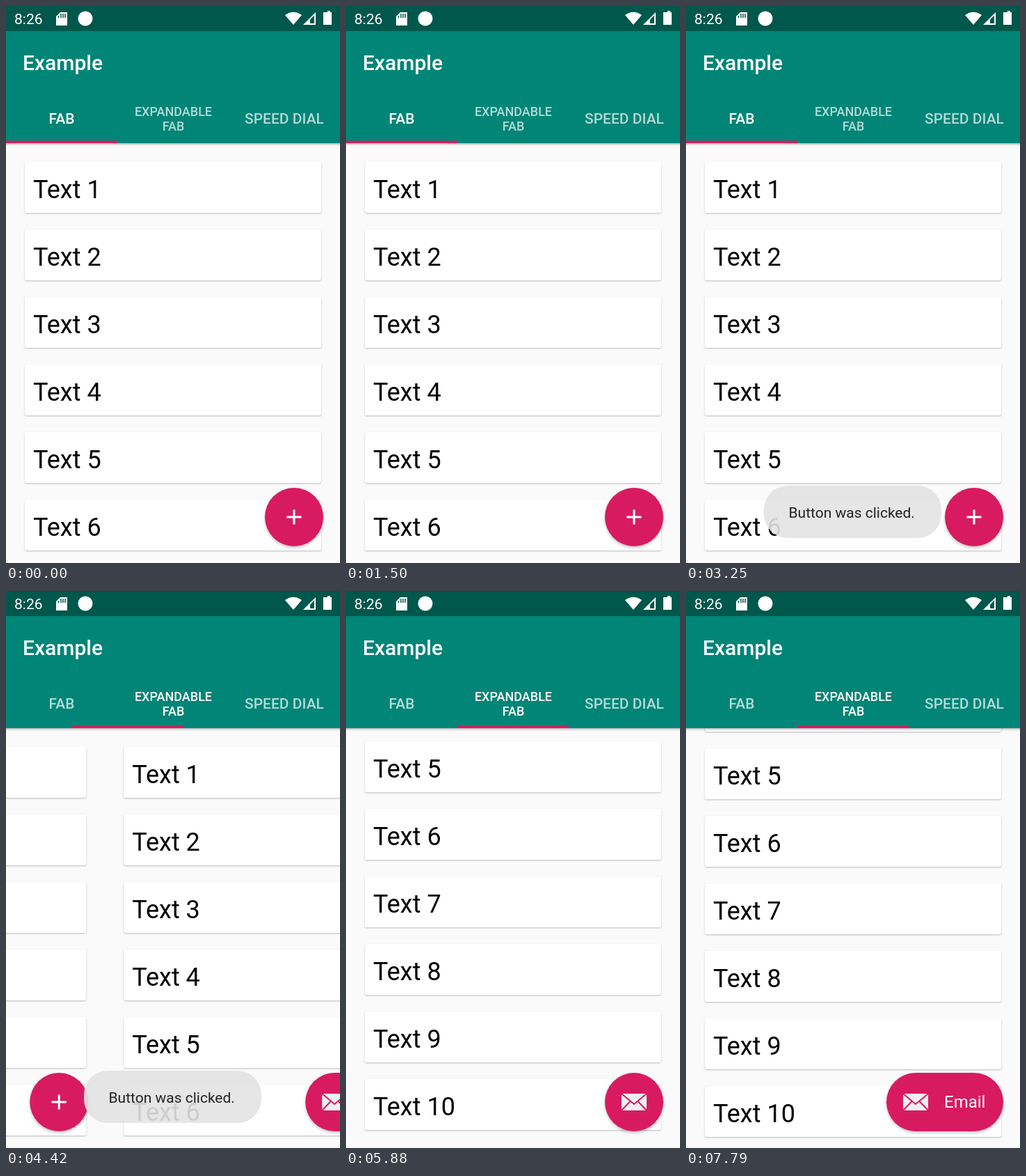
An HTML page for the animation above (8000 ms loop, 480 px wide and 800 px high).

```html
<!DOCTYPE html>
<html lang="en">
<head>
<meta charset="utf-8">
<title>Example</title>
<style>
  html, body { margin: 0; width: 100%; height: 100%; overflow: hidden; background: #fafafa; }
  svg { display: block; width: 480px; height: 800px; font-family: Roboto, sans-serif; }
  .card rect { fill: #fff; filter: drop-shadow(0 1px 1px rgba(0, 0, 0, .25)); }
  .card text { font-size: 36px; fill: #000; }
  .bar text { fill: #fff; font-weight: 500; }
  .tab { font-size: 21px; text-anchor: middle; }
  .small { font-size: 18px; }
  .fab { filter: drop-shadow(0 2px 2px rgba(0, 0, 0, .25)); }
  .accent { fill: #d81b60; }
</style>
</head>
<body>
<svg viewBox="0 0 480 800">
  <defs>
    <clipPath id="listArea"><rect y="197" width="480" height="600"/></clipPath>
    <clipPath id="pill"><rect id="pillClip" x="288" y="692" width="168" height="84" rx="42"/></clipPath>
    <linearGradient id="barShadow" x2="0" y2="1">
      <stop stop-opacity=".25"/>
      <stop offset="1" stop-opacity="0"/>
    </linearGradient>
  </defs>
  <rect width="480" height="800" fill="#fafafa"/>

  <g id="page1">
    <g clip-path="url(#listArea)"><g id="list1"></g></g>
    <g id="addFab">
      <circle class="fab accent" r="42"/>
      <circle id="ripple" fill="#fff"/>
      <path d="M-10.5 0H10.5M0-10.5V10.5" stroke="#fff" stroke-width="3"/>
    </g>
  </g>

  <g id="page2">
    <g clip-path="url(#listArea)"><g id="list2"></g></g>
    <rect id="mailFab" class="fab accent" y="692" height="84" rx="42"/>
    <g clip-path="url(#pill)">
      <g id="mailIcon">
        <rect y="722" width="36" height="24" fill="#f0f0f0"/>
        <path d="M0 722L18 737L36 722M0 746L12.5 733M36 746L23.5 733" fill="none" stroke="#d81b60" stroke-width="2"/>
      </g>
      <text id="mailLabel" y="742" font-size="24" fill="#fff">Email</text>
    </g>
  </g>

  <g class="bar">
    <rect width="480" height="197" fill="#008577"/>
    <rect y="197" width="480" height="4" fill="url(#barShadow)"/>
    <rect width="480" height="36" fill="#00574b"/>
    <text x="12" y="26" font-size="21" style="font-weight:400">8:26</text>
    <g fill="#fff">
      <path d="M78 9H88V28H72V15Z"/>
      <circle cx="114" cy="18" r="10.5"/>
      <path d="M401 13Q413 4.500 425 13L413 27Z"/>
      <path d="M427 27L445 9V27Z"/>
      <path d="M459 9H462V7H466V9H468V27H456V9Z"/>
    </g>
    <path d="M75.500 14V17M79 11V17M82 11V17M85 11V17" stroke="#00574b" stroke-width="1.500"/>
    <path d="M437 25V19.500L443 13.500V25Z" fill="#00574b"/>
    <text x="24" y="92" font-size="30">Example</text>
    <text id="tab1" class="tab" x="80" y="169">FAB</text>
    <g id="tab2">
      <text class="tab small" x="240.500" y="158">EXPANDABLE</text>
      <text class="tab small" x="240.500" y="179">FAB</text>
    </g>
    <text class="tab" x="400" y="169" opacity=".7">SPEED DIAL</text>
    <rect id="indicator" class="accent" y="193.500" width="160" height="3.500"/>
  </g>

  <g id="toast">
    <rect x="112" y="689" width="255" height="75" rx="34" fill="#e4e4e4" fill-opacity=".9"/>
    <text x="147.500" y="735" font-size="21" fill="#222">Button was clicked.</text>
  </g>
</svg>
<script>
const LOOP = 8000;
const el = id => document.getElementById(id);
const set = (id, attrs) => {
  for (const name in attrs) el(id).setAttribute(name, attrs[name]);
};
const move = (id, x, y) => set(id, { transform: `translate(${x} ${y})` });
const clamp = x => Math.min(1, Math.max(0, x));

for (const id of ['list1', 'list2']) {
  el(id).innerHTML = Array.from({ length: 10 }, (_, i) =>
    `<g class="card" transform="translate(0 ${i * 97})">
      <rect x="27" y="224" width="426" height="73" rx="3"/>
      <text x="39" y="275.500">Text ${i + 1}</text></g>`).join('');
}

// Smooth curve through [time, value] points that rests at peaks and plateaus.
function track(keys) {
  const slope = i => {
    const a = keys[i - 1], b = keys[i], c = keys[i + 1];
    if (!a || !c || (b[1] - a[1]) * (c[1] - b[1]) <= 0) return 0;
    return (c[1] - a[1]) / (c[0] - a[0]);
  };
  return t => {
    const next = keys.findIndex(k => k[0] > t);
    if (next === 0) return keys[0][1];
    if (next < 0) return keys[keys.length - 1][1];
    const [t0, v0] = keys[next - 1], [t1, v1] = keys[next];
    const d = t1 - t0, u = (t - t0) / d, w = 1 - u;
    return v0 * (1 + 2 * u) * w * w + v1 * u * u * (3 - 2 * u)
      + d * u * w * (slope(next - 1) * w - slope(next) * u);
  };
}

const scroll1 = track([[40, 0], [500, 250], [1000, 51], [1250, 0]]);
const scroll2 = track([[5280, 0], [5840, 396], [5920, 396], [6420, 240],
  [6750, 240], [6960, 341], [7150, 396], [7560, 396], [7760, 386]]);
const addScale = track([[120, 1], [300, 0], [600, 0], [800, 1]]);
const expansion = track([[5320, 1], [5500, 0], [5960, 0], [6160, 1], [6760, 1], [6930, 0], [7580, 0], [7770, 1]]);
const toastAlpha = track([[2650, 0], [2950, 1], [4650, 1], [5050, 0]]);
const indicatorX = track([[4297, 0], [4420, 94], [4597, 160]]);

function draw(t) {
  const shift = 480 * (1 - (1 - clamp((t - 4321) / 300)) ** 3);
  move('page1', -shift, 0);
  move('page2', 480 - shift, 0);
  move('list1', 0, -scroll1(t));
  move('list2', 0, -scroll2(t));

  const scale = addScale(t);
  set('addFab', { transform: `translate(414 734) scale(${scale})`, opacity: scale });
  const press = clamp((t - 2590) / 400);
  set('ripple', { r: 42 * Math.sqrt(press), opacity: press > 0 ? 0.25 * (1 - press) : 0 });

  const open = expansion(t), left = 372 - 84 * open;
  const pill = { x: left, width: 456 - left };
  set('mailFab', pill);
  set('pillClip', pill);
  move('mailIcon', left + 24, 0);
  set('mailLabel', { x: left + 83, opacity: open });

  const second = t >= 4330;
  set('tab1', { opacity: second ? 0.7 : 1 });
  set('tab2', { opacity: second ? 1 : 0.7 });
  set('indicator', { x: indicatorX(t) });
  set('toast', { opacity: toastAlpha(t) });
}

const start = performance.now();
function frame() {
  draw((performance.now() - start) % LOOP);
  requestAnimationFrame(frame);
}
frame();
</script>
</body>
</html>
```
